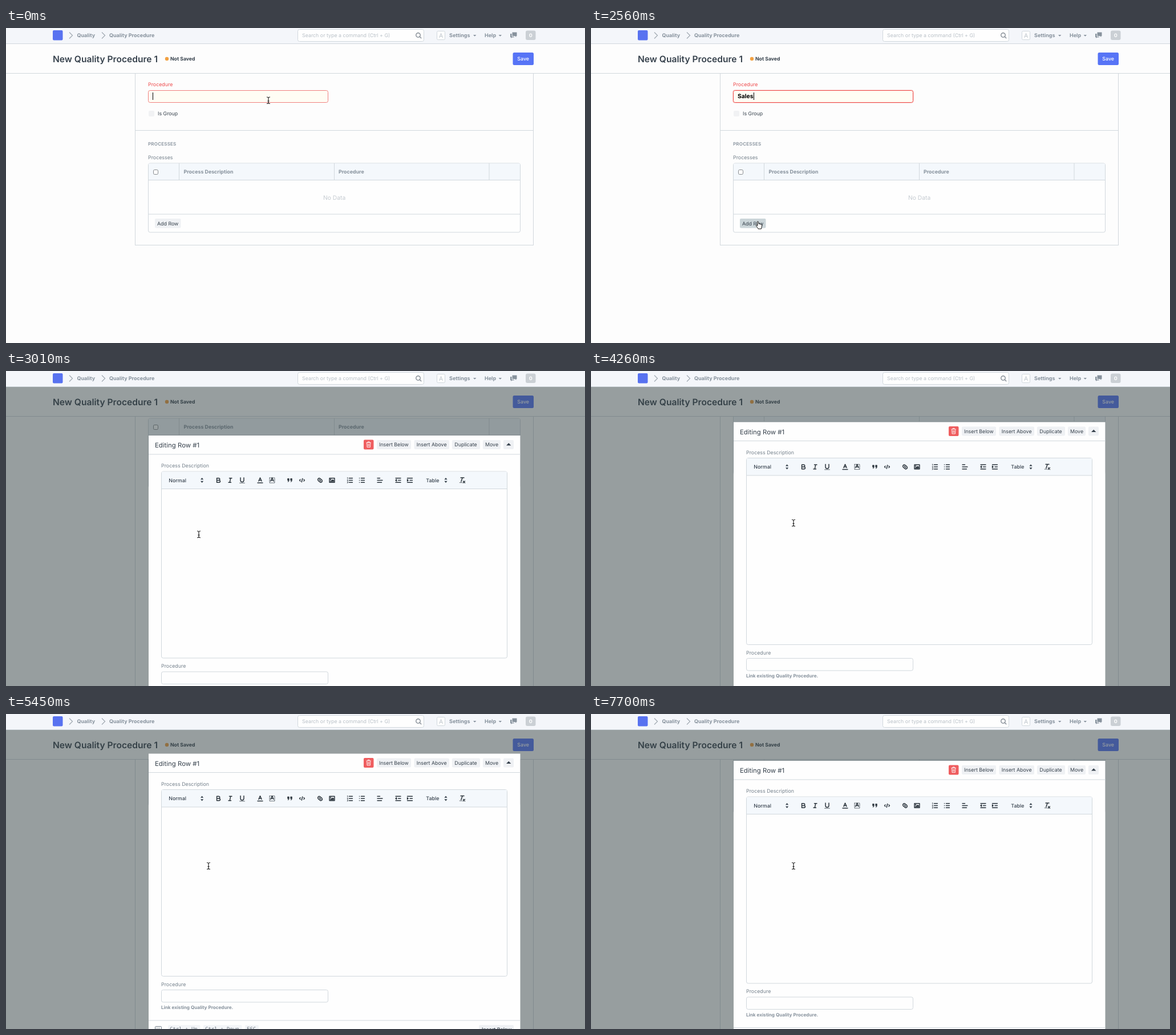
Write an HTML page that moves like this. It is 1015 by 552 pixels and loops after 8000 ms.

```html
<!DOCTYPE html>
<html lang="en">
<head>
<meta charset="utf-8">
<title>New Quality Procedure</title>
<style>
html, body { margin: 0; width: 100%; height: 100%; overflow: hidden; background: #fdfdfd; }
svg { display: block; width: 100vw; height: 100vh; font: 8.85px Inter, sans-serif; fill: #36414c; text-rendering: geometricPrecision; }
.bold { font-weight: 700; }
.mid { font-weight: 500; }
.muted { fill: #87929d; }
.label { fill: #75818c; }
.line { stroke: #d1d8dd; fill: none; }
.box { stroke: #d1d8dd; fill: #fefefe; }
.btn { fill: #eff1f4; }
.tint { fill: #f4f8fc; }
.ink { fill: none; stroke: #2b343c; stroke-width: 2; stroke-linecap: round; stroke-linejoin: round; }
.ink .solid { fill: #2b343c; }
.ink .thin { stroke-width: 1; }
.mono { font: 9px "DejaVu Sans Mono", monospace; fill: #6c7680; }
.caret { stroke: #000; }
#field { fill: #fffdf4; stroke: #f0807e; }
#glow { fill: none; stroke: #f04848; stroke-opacity: 0; stroke-width: 3; }
.focus #field { stroke: #ee4a48; }
.focus #glow { stroke-opacity: .2; }
.hover #add { fill: #cbd5d9; }
.pick #style { fill: #2476cf; }
</style>
</head>
<body>
<svg id="stage" viewBox="0 0 1015 552">
  <rect width="1015" height="552" fill="#fdfdfd"/>

  <g id="page">
    <rect id="card" class="line" x="226.5" y="40.5" width="698" height="340"/>
    <path class="line" d="M226.5 179.5H924.5"/>
    <text x="249" y="102" fill="#ee4a4c">Procedure</text>
    <rect id="glow" x="249.5" y="109.5" width="315" height="21" rx="3"/>
    <rect id="field" x="249.5" y="109.5" width="315" height="21" rx="3"/>
    <text id="typed" class="bold" x="257" y="123.3" font-size="10.36" fill="#000"></text>
    <path id="fieldCaret" class="caret" d="M.5 113V126"/>
    <rect x="250" y="145" width="10" height="10" rx="2" fill="#f1f2f4"/>
    <text x="266" y="153">Is Group</text>
    <text class="muted" x="249" y="206" font-size="8" font-weight="600" letter-spacing=".2">PROCESSES</text>
    <text class="label" x="249" y="230">Processes</text>
    <rect class="box" x="249.5" y="237" width="652" height="121" rx="3"/>
    <rect class="tint" x="250" y="237.5" width="651" height="29"/>
    <path class="line" d="M249.5 266.5H901.5M249.5 326.2H901.5M303.5 237V266M575.5 237V266M847 237V266"/>
    <rect x="258.5" y="248.5" width="8" height="8" rx="2" fill="#fff" stroke="#85898d"/>
    <g class="bold muted">
      <text x="311.5" y="255">Process Description</text>
      <text x="583" y="255">Procedure</text>
    </g>
    <text x="556" y="300.7" font-size="10.3" fill="#c5cbd1">No Data</text>
    <rect id="add" class="btn" x="261" y="334" width="45.5" height="16.5" rx="2"/>
    <text x="265" y="346">Add Row</text>
  </g>

  <g id="header">
    <rect y="27" width="1015" height="52" fill="#fdfdfd"/>
    <path class="line" d="M0 79.5H1015"/>
    <text x="82" y="60.3" font-size="15.6" font-weight="600">New Quality Procedure 1</text>
    <circle cx="282" cy="54" r="3.2" fill="#f2a142"/>
    <text class="bold" x="288" y="57" font-size="8.7">Not Saved</text>
    <rect x="888.5" y="43" width="36.5" height="22" rx="2.5" fill="#5774f6"/>
    <text class="mid" x="896.3" y="57.2" fill="#fff">Save</text>
  </g>

  <rect id="shade" y="28" width="1015" height="524" fill="#334143"/>

  <g id="navbar">
    <rect width="1015" height="27.5" fill="#f4f6fa"/>
    <path class="line" d="M0 27.5H1015"/>
    <rect x="82" y="4" width="17.5" height="17.5" rx="2" fill="#5872f0"/>
    <path d="M111 7.5l5.5 5.5-5.5 5.5M168 7.5l5.5 5.5-5.5 5.5" fill="none" stroke="#a5adb5" stroke-width="1.3"/>
    <g class="bold muted" font-size="9">
      <text x="124.5" y="16.3">Quality</text>
      <text x="181" y="16.3">Quality Procedure</text>
      <text x="777" y="16.3">Settings</text>
      <text x="839" y="16.3">Help</text>
    </g>
    <path class="muted" d="M819 12h5.4l-2.7 2.8zM863.6 12h5.4l-2.7 2.8z"/>
    <rect class="box" x="511.5" y="2.5" width="221" height="21" rx="3"/>
    <text x="519" y="16.3" fill="#b9c0c7">Search or type a command (Ctrl + G)</text>
    <g fill="none" stroke="#6c7680" stroke-width="1.2"><circle cx="722.5" cy="12.4" r="3.7"/><path d="M725.2 15.2l3 3"/></g>
    <rect class="box" x="755.5" y="5.5" width="14" height="15" rx="2"/>
    <text x="758.9" y="16.7" font-size="10.4" fill="#bcc3ca">A</text>
    <path class="muted" d="M887.5 7.5h8v6.5h-1.2v2l-2-2h-4.8zM884 10h2.5v5h4.2v1.2h-3.2l-2 1.8v-1.8H884z"/>
    <rect x="911" y="4.5" width="17.5" height="16.5" rx="3" fill="#cbd0d5"/>
    <text class="bold" x="916.8" y="16.3" fill="#fff">0</text>
  </g>

  <!-- row editor, drawn from its own top edge -->
  <g id="editor">
    <rect x="250" width="651.5" height="560" fill="#fefefe"/>
    <path class="line" d="M250 33H901.5M250 467.5H901.5"/>
    <text x="261" y="21" font-size="11.4">Editing Row #1</text>
    <rect x="627" y="7.5" width="17.5" height="17" rx="2" fill="#ef5d5f"/>
    <path d="M631.7 12.5h8M634.2 12.3v-1.3h3v1.3M632.5 13l.5 7.5h5.4l.5-7.5M634.7 14.5v4.5M636.7 14.5v4.5" fill="none" stroke="#fff" stroke-width=".9"/>
    <g class="btn">
      <rect x="650" y="8" width="60" height="16" rx="2"/>
      <rect x="715.5" y="8" width="61.5" height="16" rx="2"/>
      <rect x="782" y="8" width="49" height="16" rx="2"/>
      <rect x="836" y="8" width="31" height="16" rx="2"/>
      <rect x="872" y="8" width="18" height="16" rx="2"/>
      <rect x="829" y="475.5" width="61" height="16" rx="2"/>
    </g>
    <text x="654" y="19">Insert Below</text>
    <text x="719.7" y="19">Insert Above</text>
    <text x="786.3" y="19">Duplicate</text>
    <text x="840" y="19">Move</text>
    <path d="M877 17.5h8.4l-4.2-4.3z"/>

    <text class="label" x="272" y="56">Process Description</text>
    <rect class="box" x="272.5" y="63" width="606" height="327" rx="3"/>
    <rect class="tint" x="273" y="63.5" width="605" height="30"/>
    <path class="line" d="M272.5 93.5H878.5"/>
    <g id="style">
      <text class="mid" x="285.3" y="81.7">Normal</text>
      <path d="M341 77.3h5.2l-2.6-3.4zM341 79.7h5.2l-2.6 3.4z"/>
    </g>
    <text class="mid" x="736.3" y="81.7">Table</text>
    <path d="M768.4 77.3h5.2l-2.6-3.4zM768.4 79.7h5.2l-2.6 3.4z"/>
    <g id="tools" class="ink"></g>
    <path id="editorCaret" class="caret" d="M284.5 103.7V116.5"/>

    <text class="label" x="272" y="407">Procedure</text>
    <rect class="box" x="272.5" y="414" width="292" height="21.5" rx="3"/>
    <text class="bold muted" x="272" y="447.7" font-size="8.15">Link existing Quality Procedure.</text>

    <rect x="261.5" y="478" width="11" height="8" rx="1" fill="none" stroke="#75818c"/>
    <path d="M263 480.5h8M263 482.5h8" stroke="#75818c" stroke-dasharray="1 1"/>
    <g fill="#f3f5f8"><rect x="284" y="475.5" width="56.5" height="14" rx="2"/><rect x="346" y="475.5" width="67.5" height="14" rx="2"/><rect x="419" y="475.5" width="24" height="14" rx="2"/></g>
    <g class="mono">
      <text x="287" y="485.5">Ctrl + Up</text>
      <text x="349" y="485.5">Ctrl + Down</text>
      <text x="422" y="485.5">ESC</text>
    </g>
    <text class="mid" x="834" y="486.3">Insert Below</text>
  </g>

  <g id="cursor">
    <path id="beam" d="M-3 -5.5Q-.4 -5.5 0 -4.3Q.4 -5.5 3 -5.5M0 -4.3V4.8M-3 6Q-.4 6 0 4.8Q.4 6 3 6M-1.5 1.5H1.5" fill="none" stroke="#111" stroke-width="1.1"/>
    <path id="arrow" d="M0 0V11.5L2.7 9L4.6 13.2L6.4 12.4L4.6 8.3H8.2Z" fill="#000" stroke="#fff" stroke-width=".8"/>
    <path id="hand" d="M-1.2 .8C-1 -.3 .8 -.3 1 .8L1.6 4.5C2.2 3.8 3.6 4 3.8 4.9C4.6 4.4 5.5 4.7 5.7 5.5C6.6 5.2 7.3 5.8 7.2 6.8C7.2 9 6.3 10.5 6 13H.6C0 11 -2 9.3 -3 7.6C-3.3 6.5 -2 6.1 -1.2 6.9L-.4 7.6Z" fill="#fff" stroke="#111"/>
  </g>
</svg>
<script>
const LOOP = 8000;
const $ = id => document.getElementById(id);
const show = (id, on) => $(id).setAttribute('visibility', on ? 'inherit' : 'hidden');
const path = (d, cls = '') => `<path class="${cls}" d="${d}"/>`;

// Toolbar icons on an 18 unit grid: centre x, then the shapes
const lines = 'M7 4h8M7 9h8M7 14h8';
const letterA = 'M5.5 11L9 3l3.5 8M6.4 9h5.2';
const quote = x => path(`M${x} 5h3v4q0 3-2.5 4q1-1.5 1-3.5H${x}z`, 'solid thin');
const icons = [
  [372.5, path('M5 4h4.5a2.5 2.5 0 0 1 0 5H5zM5 9h5.5a2.5 2.5 0 0 1 0 5H5z')],
  [393, path('M7 4h6M5 14h6M8 14L10 4')],
  [414, path('M5 3v6a4 4 0 0 0 8 0V3') + path('M3 15.5h12', 'thin')],
  [445.5, path(letterA) + path('M3 15h12')],
  [466.5, path(letterA) + '<rect x="3" y="3" width="12" height="12" stroke-width="1.5" stroke-dasharray=".5 2"/>'],
  [498, quote(3.5) + quote(10.5)],
  [519, path('M5 7L3 9l2 2M13 7l2 2-2 2M10 5L8 13')],
  [550.5, path('M7 7l4 4M9 4.6a3.4 3.4 0 0 0-4.7 4.7l2 2M9 4.6l2 2M9 13.4a3.4 3.4 0 0 0 4.7-4.7l-2-2M9 13.4l-2-2')],
  [571.5, path('M3 4h12v10H3z') + path('M5 12v-1l2-2 1 1 3-3 2 2v3z', 'solid thin') + '<circle class="solid" cx="6" cy="7" r=".6"/>'],
  [603, path(lines) + path('M2.5 3l1-.7v3.4M2.5 8h1.5l-1.5 2.5h2M2.5 13h2l-1 1.2 1 .5-2 1', 'thin')],
  [624, path(lines) + path('M3 4h0M3 9h0M3 14h0')],
  [655.5, path('M3 4h6M3 9h12M3 14h10')],
  [687.5, path('M3 4h12M9 9h6M3 14h12M5 7v4L3 9z', 'solid')],
  [708, path('M3 4h12M9 9h6M3 14h12M3 7v4l2-2z', 'solid')],
  [800, path('M5 3h8M6 12L9.3 3M11 11l4 4M15 11l-4 4') + path('M2.5 14.5h6', 'thin')]
];
$('tools').innerHTML = icons.map(([x, shapes]) =>
  `<g transform="translate(${x} 78.5) scale(.74) translate(-9 -9)">${shapes}</g>`).join('');

// Each track holds its value until the next time
const typing = [[0, ''], [630, 'S'], [930, 'Sa'], [1220, 'Sal'], [1370, 'Sale'], [1670, 'Sales']];
const tops = [[0, 267], [2860, 215], [3010, 113], [3190, 93], [3360, 89.5],
  [4850, 86], [5000, 76], [5150, 64], [5300, 60], [5450, 69.5], [5600, 82]];
const pointer = [
  [0, 'beam', 460, 126.5], [1970, 'arrow', 440, 155], [2120, 'arrow', 385, 235],
  [2260, 'arrow', 322, 312], [2410, 'hand', 294, 338], [2560, 'hand', 292.5, 339],
  [2860, 'beam', 302.5, 323], [3010, 'beam', 338, 286], [3190, 'beam', 352, 270], [3360, 'beam', 355, 266]
];
const at = (track, t) => track.findLast(step => step[0] <= t).slice(1);

// Editor caret: on for 600 ms, off for 600 ms, restarted by the scroll
const blink = t => [3660, 5900].some((from, i) =>
  t >= from && t < [4850, LOOP][i] && (t - from) % 1200 < 600);

function draw(t) {
  const open = t >= 2860;
  const [top] = at(tops, t);
  const [kind, x, y] = at(pointer, t);

  $('page').setAttribute('transform', `translate(0 ${top - 267})`);
  $('editor').setAttribute('transform', `translate(0 ${top})`);
  $('card').setAttribute('height', open ? 900 : 340);
  $('shade').setAttribute('opacity', !open ? 0 : t < 3010 ? .43 : .5);
  show('editor', open);
  show('editorCaret', open && blink(t));

  $('typed').textContent = at(typing, t)[0];
  const end = 257 + Math.round($('typed').getComputedTextLength());
  $('fieldCaret').setAttribute('transform', `translate(${end} 0)`);
  show('fieldCaret', !open);

  $('cursor').setAttribute('transform', `translate(${x} ${y})`);
  for (const id of ['beam', 'arrow', 'hand']) show(id, id === kind);

  const states = { focus: t >= 150, hover: kind === 'hand', pick: open && t < 3010 };
  for (const name in states) $('stage').classList.toggle(name, states[name]);
}

const start = performance.now();
function tick() {
  draw((performance.now() - start) % LOOP);
  requestAnimationFrame(tick);
}
tick();
</script>
</body>
</html>
```
